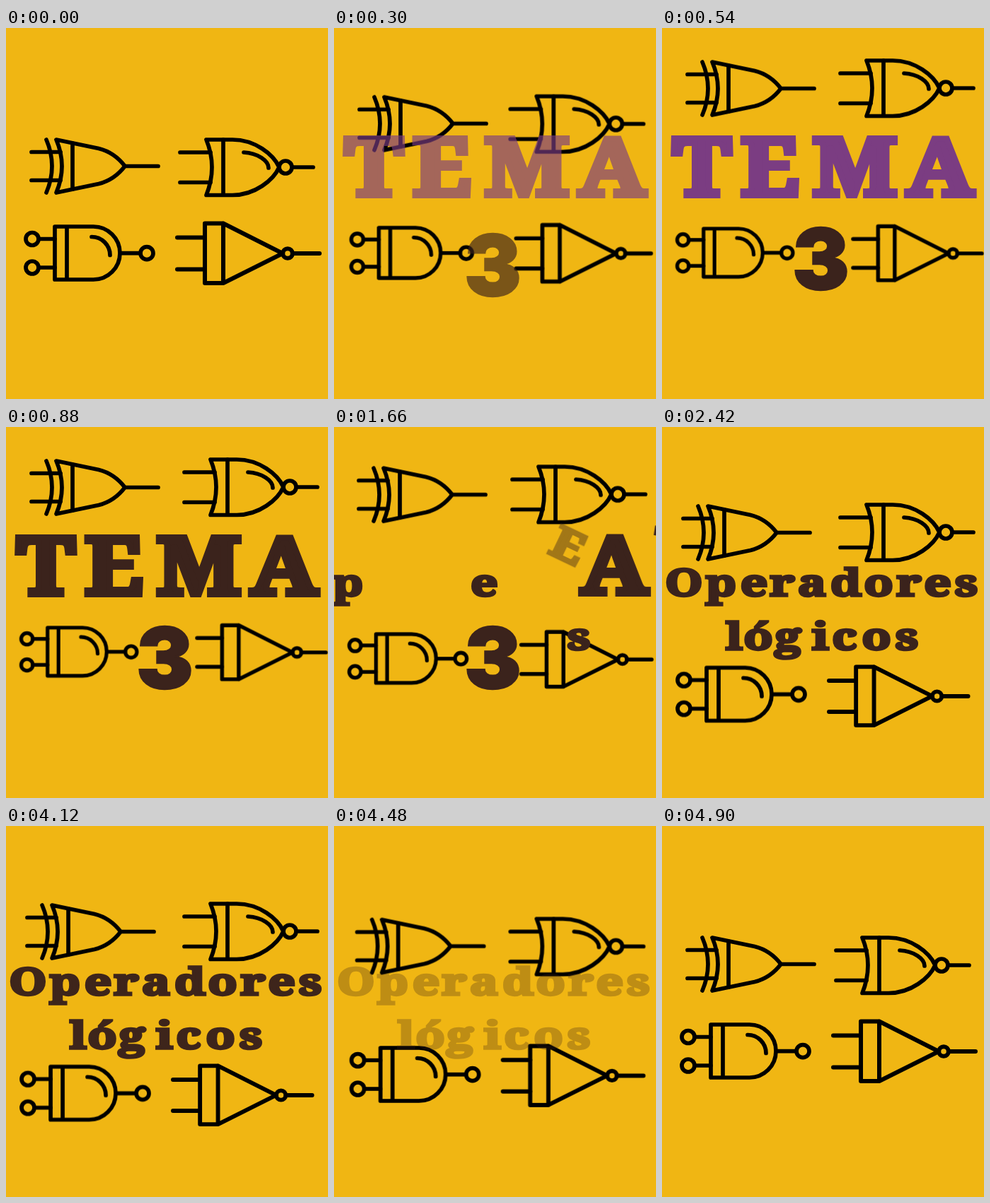
Write an HTML page without scripts that moves like this. It is 455 px wide and 525 px high and loops after 5000 ms.

```html
<!DOCTYPE html>
<html lang="es">
<head>
<meta charset="utf-8">
<title>Operadores lógicos</title>
<style>
html, body { margin: 0; width: 100%; height: 100%; overflow: hidden; background: #f0b613; }
svg { display: block; width: 455px; height: 525px; }

/* Gates: three poses */
.gate {
  fill: none; stroke: #000; stroke-width: 5.7;
  stroke-linecap: round; stroke-linejoin: round;
  animation: pose 5s infinite cubic-bezier(.37, 0, .63, 1);
}
@keyframes pose {
  0%, .4%, 98%, 100% { transform: none; }
  11%, 27.8% { transform: var(--mid); }
  48.4%, 82.3% { transform: var(--end); }
}
.xor { --mid: translate(0px, -110px) scale(1); --end: translate(-6px, -46px) scale(1); }
.nor { --mid: translate(6px, -112px) scale(1); --end: translate(6px, -48px) scale(1); }
.and { --mid: translate(-4px, 28.8px) scale(.908); --end: translate(-6px, 59.6px) scale(1); }
.not { --mid: translate(51px, 30.3px) scale(.905); --end: translate(-.7px, 69px) scale(.978); stroke-width: 6; }

/* Extended slab face */
text { text-anchor: middle; fill: currentColor; stroke: currentColor; stroke-linejoin: miter; scale: var(--wide) 1; }
.slab { font-family: "Noto Serif", serif; font-weight: 900; }
.big { --wide: 1.12; font-size: 112px; stroke-width: 8; }
.small { --wide: 1.28; font-size: 53px; stroke-width: 3.4; }
.digit { --wide: 1; font: 900 120px Inter, sans-serif; stroke-width: 2.6; }

/* First title */
.tema { animation: show 5s infinite linear, tint 5s infinite linear; }
.three { color: #3b231c; animation: show 5s infinite linear, rise 5s infinite ease-out; }
@keyframes show {
  0%, .4% { opacity: 0; }
  9%, 39% { opacity: 1; }
  39.2%, 100% { opacity: 0; }
}
@keyframes tint {
  0%, 11% { color: #7b3d82; }
  17.6%, 100% { color: #3b231c; }
}
@keyframes rise {
  0%, .4% { transform: translateY(36px); }
  10.4%, 100% { transform: none; }
}
.out, .in { animation: 5s linear infinite; animation-delay: calc(var(--s) * 1ms - 5s); }
.out { animation-name: whirl; }
@keyframes whirl {
  0%, 60.01%, 100% { translate: 0px 0px; rotate: 0deg; scale: var(--wide) 1; opacity: 1; }
  1.6% { translate: 246px -79px; rotate: 8deg; scale: var(--wide) 1; opacity: 1; }
  3.2% { translate: 176px -31px; rotate: 25deg; scale: .63 .56; opacity: .44; }
  4.6%, 60% { translate: 366px 61px; rotate: 60deg; scale: .05 .05; opacity: 0; }
}

/* Second title */
.ops { color: #3b231c; animation: ops 5s infinite linear; }
@keyframes ops {
  0%, 28.3% { opacity: 0; }
  28.4%, 82.3% { opacity: 1; }
  92.4%, 100% { opacity: 0; }
}
.in { animation-name: fly; }
@keyframes fly {
  0%, 66.01%, 100% { translate: -40px; }
  4.8%, 66% { translate: var(--x); }
}
</style>
</head>
<body>
<svg viewBox="0 0 455 525">
  <rect width="455" height="525" fill="#f0b613"/>

  <g class="gate xor">
    <path d="M57 158Q73 195.5 57 233M36 175.5H77M36 215.5H77M94 163V228M168 195.5H215"/>
    <path d="M71 158L131 170.5C149 175 160 185 168 195.5C160 206 149 216 131 220.5L71 233Q87 195.5 71 158Z"/>
  </g>
  <g class="gate nor">
    <path d="M283 158H320C352 158 378 179 386 197C378 215 352 236.5 320 236.5H283Q299 197 283 158Z"/>
    <path d="M246 176H289M246 218.5H289M307 158V236M336 176C356 177 371 188 371 198M404 197H434"/>
    <circle cx="395" cy="197" r="9"/>
  </g>
  <g class="gate and">
    <path d="M69 281H123.5A37.5 37.5 0 0 1 123.5 356H69ZM86 281V356"/>
    <path d="M46 298.5H69M46 339H69M162 318.7H190M121 295.5A26 26 0 0 1 147 321.5"/>
    <circle cx="37" cy="298.5" r="9"/>
    <circle cx="37" cy="339" r="9"/>
    <circle cx="199" cy="318.7" r="9"/>
  </g>
  <g class="gate not">
    <path d="M281 276.5H307V361H281ZM307 276.5L391 319L307 361"/>
    <path d="M242 296.5H281M242 341.5H281M405 319H443"/>
    <circle cx="398" cy="319" r="6.8"/>
  </g>

  <g class="tema slab big">
    <g transform="translate(56.5 197)"><text class="out" style="--s:1420" y="40">T</text></g>
    <g transform="translate(152.5 197)"><text class="out" style="--s:1500" y="40">E</text></g>
    <g transform="translate(272.5 197)"><text class="out" style="--s:1580" y="40">M</text></g>
    <g transform="translate(393 197)"><text class="out" style="--s:1660" y="40">A</text></g>
  </g>
  <g class="three">
    <g transform="translate(224.5 327)"><text class="out digit" style="--s:1690" y="43.2">3</text></g>
  </g>

  <g class="ops slab small">
    <g transform="translate(0 239.3)">
      <text class="in" style="--x:31px;--s:1780">O</text>
      <text class="in" style="--x:83px;--s:1545">p</text>
      <text class="in" style="--x:130px;--s:1740">e</text>
      <text class="in" style="--x:170px;--s:1941">r</text>
      <text class="in" style="--x:212px;--s:1700">a</text>
      <text class="in" style="--x:260px;--s:1790">d</text>
      <text class="in" style="--x:306px;--s:1992">o</text>
      <text class="in" style="--x:349px;--s:1944">r</text>
      <text class="in" style="--x:389.5px;--s:1520">e</text>
      <text class="in" style="--x:430px;--s:1670">s</text>
    </g>
    <g transform="translate(0 314.8)">
      <text class="in" style="--x:102px;--s:2045">l</text>
      <text class="in" style="--x:136px;--s:1800">ó</text>
      <text class="in" style="--x:178px;--s:1770">g</text>
      <text class="in" style="--x:224px;--s:1740">i</text>
      <text class="in" style="--x:258px;--s:1700">c</text>
      <text class="in" style="--x:303px;--s:1660">o</text>
      <text class="in" style="--x:346px;--s:1420">s</text>
    </g>
  </g>
</svg>
</body>
</html>
```
